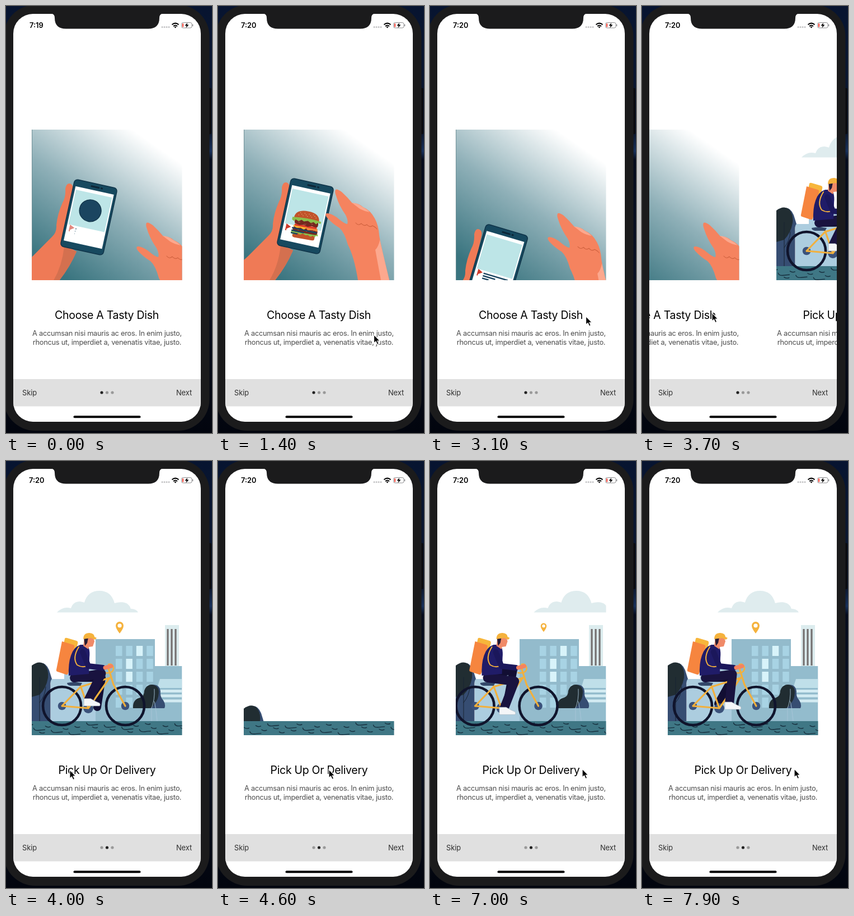
Animation of 368 by 760 pixels, one loop 8000 ms. Source, as an HTML page:

```html
<!DOCTYPE html>
<html lang="en">
<head>
<meta charset="utf-8">
<title>Onboarding</title>
<style>
html, body { margin: 0; width: 100%; height: 100%; overflow: hidden; background: #050b1b; }
svg { display: block; width: 368px; height: 760px; font-family: Inter, Roboto, sans-serif; }
.title { font-size: 19.5px; letter-spacing: -.3px; fill: #000; text-anchor: middle; }
.body { font-size: 12.8px; letter-spacing: -.26px; fill: #4c4c4c; text-anchor: middle; }
.nav { font-size: 12.9px; letter-spacing: -.1px; fill: #303030; }
.clock { font-size: 12.8px; font-weight: 600; }
.line { fill: none; stroke-linecap: round; stroke-linejoin: round; }
</style>
</head>
<body>
<svg viewBox="0 0 368 760">
<defs>
  <clipPath id="screen"><rect x="13" y="14" width="335" height="726" rx="35"/></clipPath>
  <clipPath id="art"><rect x="46" y="220" width="268.5" height="268"/></clipPath>
  <clipPath id="aboveGround"><rect x="46" y="220" width="268.5" height="243.5"/></clipPath>
  <linearGradient id="sky" gradientUnits="userSpaceOnUse" x1="100" y1="480" x2="262" y2="245">
    <stop stop-color="#39747f"/><stop offset=".5" stop-color="#8fb0b8"/><stop offset="1" stop-color="#fff"/>
  </linearGradient>
  <linearGradient id="desk" x2="0" y2="1">
    <stop stop-color="#071430"/><stop offset=".3" stop-color="#0c1830"/><stop offset=".34" stop-color="#17305a"/>
    <stop offset=".36" stop-color="#050b1c"/><stop offset=".62" stop-color="#0a1124"/><stop offset="1" stop-color="#02050e"/>
  </linearGradient>
  <g id="copy">
    <text class="body" x="180.5" y="587">A accumsan nisi mauris ac eros. In enim justo,</text>
    <text class="body" x="180.5" y="602.5">rhoncus ut, imperdiet a, venenatis vitae, justo.</text>
  </g>
</defs>

<rect width="368" height="760" fill="url(#desk)"/>
<rect x="362" y="146" width="5" height="82" rx="2" fill="#0a0b0f"/>
<rect x="-4" y="-2" width="367.5" height="758" rx="56" fill="#1b1b1c"/>
<rect x="13" y="14" width="335" height="726" rx="35" fill="#fff"/>

<g clip-path="url(#screen)">
  <g id="page1">
    <g clip-path="url(#art)">
      <rect x="46" y="220" width="269" height="268" fill="url(#sky)"/>
      <path d="M46.5 220V488" stroke="#6f8f96"/>
      <g id="arm">
        <path fill="#ef7a56" d="M-120 600L46 447L82 411Q91 403 90 390Q92 370 101 350Q107 340 106 325Q108 315 114 316Q121 318 119 328L114 350L110 428L126 437Q114 465 94 490L40 600Z"/>
        <path fill="#d4704f" d="M104 428L126 437Q114 465 94 490L40 600H10L84 490Q100 464 104 428Z"/>
      </g>
      <g id="phone">
        <rect x="-39" y="-61" width="78" height="122" rx="6" fill="#17495f" stroke="#103449" stroke-width="1.5"/>
        <rect x="-35" y="-49" width="70" height="99" fill="#fff"/>
        <rect x="-33" y="-43" width="66" height="63" fill="#bde5e7"/>
        <path class="line" d="M-7 -55H6M11 -55h1" stroke="#0d2536" stroke-width="3"/>
        <circle id="disc" cy="-12" r="19.5" fill="#1b4560" stroke="#0f3044" stroke-width="1.2"/>
      </g>
      <g id="burger">
        <path fill="#c1532a" d="M-40 -18Q-38 -43 0 -43Q36 -43 38 -18Z"/>
        <g id="seeds" fill="#f4c48d"></g>
        <path fill="#c1532a" d="M-36 25H33V37Q33 43 26 43H-29Q-36 43 -36 37Z"/>
        <path fill="#8bbf4b" d="M-41 22Q0 14 41 22L42 28L36 27L33 33L27 28Q20 36 12 29L4 31L-6 27Q-14 36 -20 28L-30 31L-34 35L-42 30Z"/>
        <rect x="-38" y="9" width="77" height="16" rx="7" fill="#74281f"/>
        <path fill="#ef8a3e" d="M0 6H38V14L22 12L8 15Z"/>
        <path fill="#f8b432" d="M-38 6H6L-4 15L-14 11L-26 13L-38 9Z"/>
        <rect x="-35" y="1" width="70" height="6" rx="3" fill="#df3b28"/>
        <path fill="#74281f" d="M-36 -8Q-38 -15 -28 -15H30Q38 -15 37 -7Q38 2 30 2L18 0L6 4L-6 0L-20 3L-30 1Q-37 0 -36 -8Z"/>
        <path class="line" d="M-25 -6q3 4 6 0M-6 -3q3 4 6 0M15 -7q3 4 6 0M-24 17q3 4 6 0M2 18q3 4 6 0M20 14q3 4 6 0" stroke="#b9705c" stroke-width="1.2"/>
        <path fill="#8bbf4b" d="M-45 -18Q0 -24 44 -18Q46 -13 42 -11L36 -14L30 -8L22 -13L14 -9L4 -14L-8 -10L-16 -14L-24 -8L-34 -12L-38 -6L-45 -10Z"/>
      </g>
      <g id="label">
        <path fill="#cf3a2b" d="M-30 20L-21 24L-28 29V32H-30Z"/>
        <path id="lines" d="M-19 25H26M-19 29.5H4M-19 34H-7" stroke="#1b4560" stroke-width="2.4"/>
      </g>
      <g id="hand">
        <path fill="#f5835f" d="M210 327Q213 325 221 331Q231 340 240 351Q252 351 259 358Q272 363 280 378Q287 391 288 408Q290 423 306 488L330 600H275L250 488Q243 445 232 425Q226 403 217 395Q205 388 195 377Q190 371 194 369Q200 368 212 376Q226 388 231 388Q233 382 228 372Q216 355 211 338Q208 331 210 327Z"/>
        <path fill="#fca88e" d="M289 416Q293 434 306 488L330 600H312L291 488L281 434Q287 428 289 416ZM239 350Q250 351 257 357Q265 361 271 367Q260 365 252 360Z"/>
        <path class="line" d="M246 386q5 6 10 1q5 6 10 2q5 6 10 2q6 3 8 6" stroke="#d0623f" stroke-width="1.1"/>
      </g>
    </g>
    <text class="title" x="180" y="557">Choose A Tasty Dish</text>
    <use href="#copy"/>
  </g>

  <g id="page2">
    <g clip-path="url(#art)">
      <path id="cloud" fill="#dfecee" d="M0 269.5Q11 258 25 262Q29 250 41 250Q47 251 49 252Q55 231 76 231Q97 231 103 253Q127 247 132 263Q142 263 145 269.5Z"/>
      <g clip-path="url(#aboveGround)">
        <g id="tower">
          <rect x="284" y="292" width="25" height="74" fill="#dcecee"/>
          <path d="M289 299V364M296 299V364M303 299V364" stroke="#757171" stroke-width="3.2"/>
          <path fill="#93bccd" d="M266 365H315V464H266Z"/>
          <path fill="#bfdfe9" d="M275 388H315V404H270Z"/>
          <path d="M272 409.5H315M272 418H315M272 427H315" stroke="#d3ebf2" stroke-width="5"/>
        </g>
        <path id="block" fill="#accddf" d="M80 464V388H104V365H162V464Z"/>
        <g id="office"><rect x="160" y="317" width="106" height="147" fill="#93bbcc"/></g>
        <g id="tree">
          <path fill="#364d72" d="M46 366Q68 350 77 372L82 388Q79 390 79.5 400V464H46Z"/>
          <path fill="#212d32" d="M46 364Q59 354 69 362Q77 372 75 386Q72 404 60 416L46 420Z"/>
          <path class="line" d="M60 385V464M60 430Q70 418 71 402" stroke="#182433"/>
        </g>
        <g id="shrub">
          <path fill="#364d72" d="M258 399Q274 395 276 410Q275 420 281 426Q286 434 283 440H250Z"/>
          <path fill="#212d32" d="M227 440Q226 424 240 421Q247 418 247 409Q250 398 261 398Q274 400 273 413Q272 426 265 432Q262 440 255 440Z"/>
          <path class="line" d="M260 464V440Q266 425 265 406M270 463Q268 440 265 428" stroke="#a9c6d8" stroke-width=".9"/>
        </g>
      </g>
      <rect x="46" y="463" width="269" height="25" fill="#3f7785"/>
      <path id="ripples" class="line" stroke="#17303f" stroke-width="1.4"/>
      <g id="pin">
        <path fill="#f5b23d" d="M203 307Q196 298 196 293A7 7 0 0 1 210 293Q210 298 203 307Z"/><circle cx="203" cy="293" r="3.6" fill="#fff"/>
      </g>
      <g id="bike">
        <path id="farLeg" class="line" stroke="#120e33" stroke-width="14"/>
        <g fill="none" stroke="#10142c" stroke-width="4.6"><circle cx="91" cy="436" r="34"/><circle cx="204" cy="436" r="34"/></g>
        <g fill="#3b527b"><circle cx="91" cy="436" r="7.3"/><circle cx="204" cy="436" r="7.3"/><circle cx="138" cy="440" r="9"/></g>
        <path class="line" d="M91 436L138 440L124 400M91 436L124 402L176 386L138 440M174 369L183 398L204 436" stroke="#f2b03d" stroke-width="3.2"/>
        <path class="line" d="M168 377Q183 379 183 368Q181 360 174 362" stroke="#f2b03d" stroke-width="2.6"/>
        <path fill="#33476a" d="M100 395Q112 392 127 395L124 400H106Q100 399 100 395Z"/>
        <path fill="#f7b63b" d="M96 316Q97 314 100 315L117 320Q120 321 119 325L106 377L84 372Z"/>
        <path fill="#f6853f" d="M91 321L111 327Q114 328 113 331L102 378Q101 381 98 380L83 375Q80 374 81 371Z"/>
        <path id="nearLeg" class="line" stroke="#19133f" stroke-width="16"/>
        <path id="shoe" fill="#f4f6f8" stroke="#aeb9c5" stroke-width=".7" d="M-8 -6H4Q12 -1 20 2Q22 5 20 7H-8Z"/>
        <path fill="#201c68" d="M124 327Q112 331 107 346Q102 360 103 382L139 379L140 350Q142 330 133 327Z"/>
        <path class="line" d="M121 331Q109 350 118 363Q128 369 137 364" stroke="#f2b03d" stroke-width="2"/>
        <path class="line" d="M128 340L138 365L164 368" stroke="#1b175b" stroke-width="10"/>
        <path class="line" d="M168 368L179 365" stroke="#f5835f" stroke-width="7"/>
        <path fill="#f08a68" d="M131 314H147L149 321L146 330L139 331L138 335L129 329Z"/>
        <path fill="#251b35" d="M130 314H138L136 324L132 329Z"/>
        <path fill="#f5b23d" d="M129 317Q129 306 140 306Q149 307 149 313L153 315L150 318L143 315Z"/>
      </g>
    </g>
    <text class="title" x="180.5" y="557">Pick Up Or Delivery</text>
    <use href="#copy"/>
  </g>

  <rect x="13" y="664" width="335" height="48.5" fill="#e0e0e0"/>
  <text class="nav" x="29" y="692.5">Skip</text>
  <text class="nav" x="304" y="692.5">Next</text>
  <circle id="dot1" cx="171" cy="688" r="2.6"/><circle id="dot2" cx="180.5" cy="688" r="2.6"/>
  <circle cx="190" cy="688" r="2.6" fill="#999"/>
  <rect x="120.5" y="729.2" width="120" height="4" rx="2"/>
</g>

<path fill="#1b1b1c" d="M80 13Q87 14 87 21Q87 40.5 107 40.5H254Q274 40.5 274 21Q274 14 281 13Z"/>
<text id="clock" class="clock" x="41" y="38.5"></text>
<path class="line" d="M279 37.5h.1m3.9 0h.1m3.9 0h.1m3.9 0h.1" stroke="#c4c4c6" stroke-width="3"/>
<path d="M296.5 33.2Q302.5 28 308.5 33.2M299 36Q302.5 33 306 36" fill="none" stroke="#000" stroke-width="2"/>
<path d="M300.5 37.3Q302.5 35.5 304.5 37.3L302.5 39.5Z"/>
<rect x="313.5" y="29.5" width="18.5" height="9.5" rx="2.8" fill="#fff" stroke="#8e8e90"/>
<path d="M333.5 32.5v3.5" stroke="#8e8e90" stroke-width="1.5"/>
<rect x="315" y="31" width="2" height="6.5" rx=".8" fill="#f23b30"/>
<path d="M324 30L319.5 35H322.5L321.5 39L326.5 33.5H323.5Z"/>
<path id="cursor" d="M0 0V15L3.5 12L6 17.5L8.7 16.3L6.3 11H10.8Z" stroke="#fff" stroke-width="1.2"/>
</svg>

<script>
const $ = id => document.getElementById(id);
const set = (id, name, value) => $(id).setAttribute(name, value);
const place = (id, x, y, rot = 0, sx = 1, sy = sx) =>
  set(id, 'transform', `translate(${x} ${y}) rotate(${rot}) scale(${sx} ${sy})`);
const clamp = v => Math.max(0, Math.min(1, v));
const part = (t, from, to) => clamp((t - from) / (to - from));
const smooth = p => p * p * (3 - 2 * p);
const backOut = p => 1 + 2.2 * (p - 1) ** 3 + 1.2 * (p - 1) ** 2;

// Eased value at time t through flat pairs: time, value, time, value...
function key(t, ...k) {
  if (t <= k[0]) return k[1];
  for (let i = 2; i < k.length; i += 2)
    if (t < k[i]) return k[i - 1] + (k[i + 1] - k[i - 1]) * smooth(part(t, k[i - 2], k[i]));
  return k[k.length - 1];
}

function add(parent, tag, attrs) {
  const el = document.createElementNS('http://www.w3.org/2000/svg', tag);
  for (const name in attrs) el.setAttribute(name, attrs[name]);
  $(parent).append(el);
}

for (let i = 0; i < 13; i++)
  add('seeds', 'ellipse', { cx: -27 + i * 4.5, cy: -27 - (i * 5 % 3) * 4, rx: 1.3, ry: .9 });

const lit = ['2,0', '1,1', '1,2'];
for (let col = 0; col < 4; col++)
  for (let row = 0; row < 5; row++)
    add('office', 'rect', {
      x: 196 + col * 18.4, y: 329 + row * 23, width: 11.5, height: 18,
      fill: lit.includes(`${col},${row}`) ? '#d8f3fa' : '#a8d3e4'
    });

let waves = '';
for (let i = 0; i < 60; i++) {
  const x = 46 + i * 10.5, y = 466 + (i % 30) * 7.3 % 18;
  waves += i % 3 ? `M${x} ${y}q4 3 9 1` : `M${x} ${y}q1 5 10 4t10 -1`;
}
set('ripples', 'd', waves);

function leg(id, angle) {
  const hip = [113, 386], thigh = 49, shin = 53;
  const foot = [146 + 10 * Math.cos(angle), 432 + 10 * Math.sin(angle)];
  const dx = foot[0] - hip[0], dy = foot[1] - hip[1], d = Math.hypot(dx, dy);
  const bend = Math.acos((thigh ** 2 + d * d - shin ** 2) / (2 * thigh * d));
  const a = Math.atan2(dy, dx) - bend;
  set(id, 'd', `M${hip}L${hip[0] + thigh * Math.cos(a)} ${hip[1] + thigh * Math.sin(a)}L${foot}`);
  return foot;
}

function dishScene(t) {
  const x = key(t, 0, 148, 1100, 156, 1500, 156, 1950, 152, 2950, 152, 3450, 10);
  const y = key(t, 0, 376, 1100, 374, 1500, 374, 1950, 406, 2950, 406, 3450, 640);
  const tilt = key(t, 1500, 12.4, 1950, 16.5);
  place('arm', x - 148, y - 376);
  place('phone', x, y, tilt);
  place('label', x, y, tilt);
  set('label', 'opacity', key(t, 0, .6, 300, 1));
  const drawn = key(t, 0, .04, 500, 1);
  place('lines', -19 * (1 - drawn), 0, 0, drawn, 1);
  set('disc', 'r', key(t, 300, 19.5, 600, 0));
  set('disc', 'stroke-width', t < 600 ? 1.2 : 0);
  const out = key(t, 1450, 0, 2000, 1, 2750, 1, 3050, 0);
  const size = t < 2900 ? backOut(part(t, 550, 900)) * (t > 550) : 1 - part(t, 2900, 3100);
  place('burger', x + 1 + (188.5 - x) * out, y + 16 + (261 - y) * out, 10 * (1 - out), size * (.58 + .42 * out));
  place('hand',
    key(t, 350, 41, 1150, 0, 1450, 0, 1900, -11, 2750, -11, 3400, 41),
    key(t, 350, 59, 1150, 0, 1450, 0, 1900, 21, 2750, 21, 3400, 59));
}

function cityScene(t) {
  const rise = (id, height, from, to) => place(id, 0, height * (1 - backOut(part(t, from, to))));
  rise('tree', 108, 4560, 5100);
  rise('block', 110, 4640, 5150);
  rise('office', 160, 4700, 5250);
  rise('tower', 185, 4800, 5350);
  rise('shrub', 80, 5000, 5500);
  place('cloud', 264 - (t - 5600) * .0561, 0);
  place('ripples', -(t * .025) % 315, 0);
  const drop = backOut(part(t, 6900, 7300));
  place('pin', 203 * (1 - drop), 296 * (1 - drop), 0, t < 6900 ? 0 : drop);
  const enter = 1 - (1 - part(t, 5800, 7100)) ** 3;
  place('bike', -230 * (1 - enter) + (t - 7900) * .0115, 0);
  const turn = (t - 7900) / 1300 * 2 * Math.PI;
  const foot = leg('nearLeg', turn);
  leg('farLeg', turn + Math.PI);
  place('shoe', foot[0], foot[1] + 3);
}

function draw(t) {
  const scroll = key(t, 3540, 0, 3600, -6, 3700, -141, 4000, -335);
  place('page1', scroll, 0);
  place('page2', scroll + 335, 0);
  dishScene(t);
  cityScene(t < 4300 ? 8686 : t);
  const second = scroll < -168;
  set('dot1', 'fill', second ? '#999' : '#222');
  set('dot2', 'fill', second ? '#222' : '#999');
  $('clock').textContent = t < 1200 ? '7:19' : '7:20';
  set('clock', 'x', t < 1200 ? 42 : 41);
  place('cursor',
    key(t, 800, 300, 1400, 278.5, 2100, 279.3, 3000, 280, 3500, 266, 3600, 260, 3700, 125, 3850, 104, 4600, 198, 5350, 272),
    key(t, 800, 745, 1400, 585, 2100, 569.5, 3500, 548, 3700, 546, 4200, 552, 4600, 549, 5000, 564, 5450, 548));
  set('cursor', 'visibility', t < 800 ? 'hidden' : 'visible');
}

const start = performance.now();
function tick() {
  draw((performance.now() - start) % 8000);
  requestAnimationFrame(tick);
}
tick();
</script>
</body>
</html>
```
